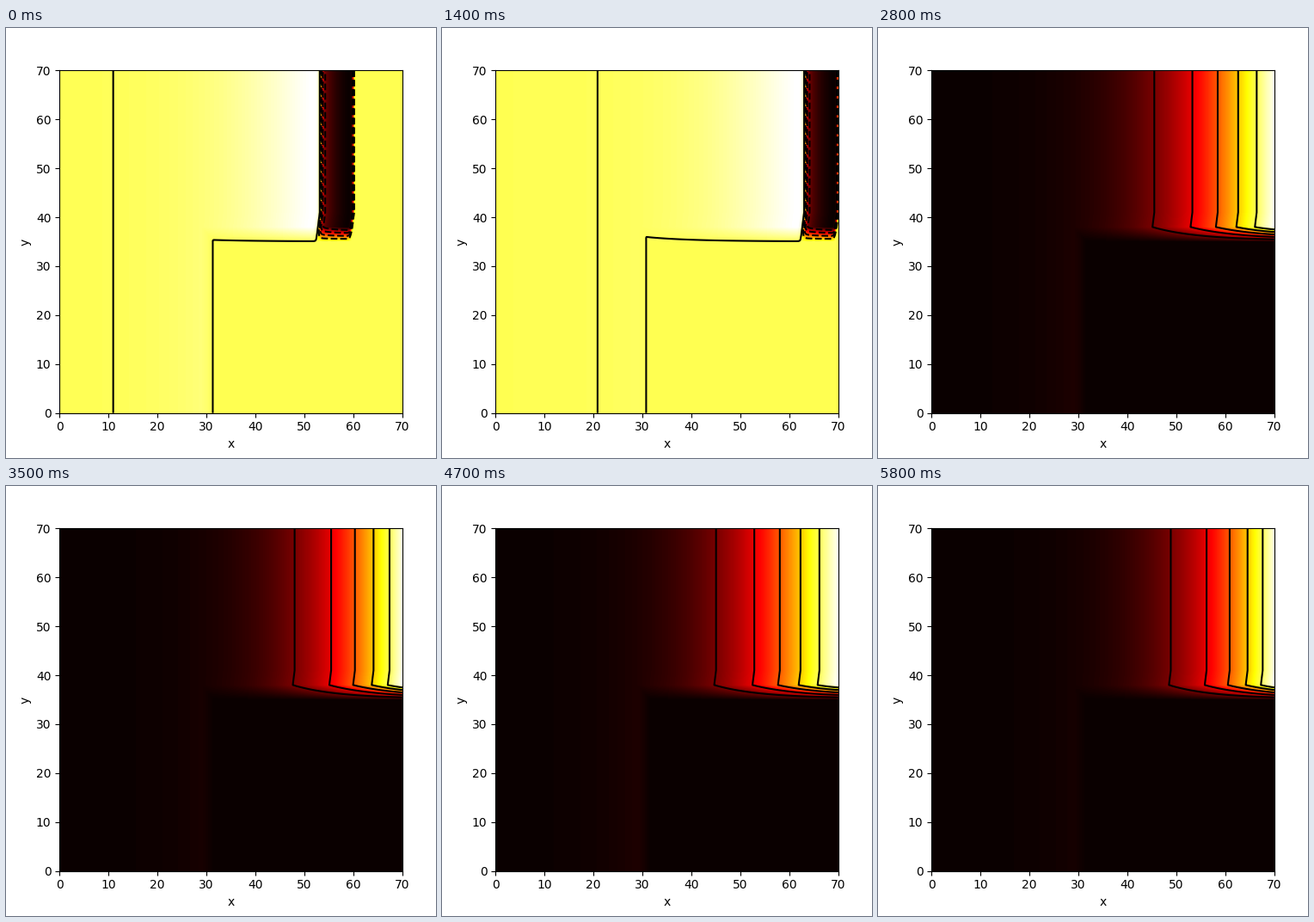
A matplotlib script for the animation above (5900 ms loop, 500 by 500 pixels).

```python
import numpy as np
import matplotlib.pyplot as plt
from matplotlib.animation import FuncAnimation

SIZE = 70
FRAMES = 59
REPLAY_AT, REPLAY_SHIFT = 39, 20
SPEED = 0.705
START = 53.1

axis = np.linspace(0, SIZE, 351)
half = (axis[1] - axis[0]) / 2
X, Y = np.meshgrid(axis, axis)

# The lower right block was reset to rest; its borders are soft ramps.
upper = np.clip((Y - 35) / 3, 0, 1)
left = np.clip((31.6 - X) / 2.6, 0, 1)
mask = np.maximum(upper, left)
lag = 0.75 * np.clip((41 - Y) / 6, 0, 1) * (1 - left)


def step(d, width):
    return 1 / (1 + np.exp(-np.clip(d / width, -60, 60)))


def field(step_no):
    """Travelling pulse: sharp front, slow plateau, sharp back, long tail."""
    d = X - (START + SPEED * step_no - lag)
    tail = 1.08 * np.exp(-(np.maximum(-d, 0) / 17.6) ** 1.4)
    plateau = 5.24 - 1.55 * np.exp(-0.33 * np.maximum(d, 0))
    back = step(d - 0.324, 0.234)
    front = step(6.85 - d, 0.12)
    return mask * front * ((1 - back) * tail - back * plateau)


fig = plt.figure(figsize=(5, 5), dpi=100)
ax = fig.add_axes([0.1245, 0.1045, 0.7975, 0.797])
image = ax.imshow(field(0), cmap="hot", origin="lower", aspect="auto",
                  interpolation="bilinear",
                  extent=(-half, SIZE + half, -half, SIZE + half))
ax.set(xlim=(0, SIZE), ylim=(0, SIZE), xlabel="x", ylabel="y")
ax.set_xticks(range(0, SIZE + 1, 10))
ax.set_yticks(range(0, SIZE + 1, 10))
contours = []


def update(i):
    u = field(i if i < REPLAY_AT else i - REPLAY_SHIFT)
    low, high = u.min(), u.max()
    image.set_data(u)
    image.set_clim(low, high)
    while contours:
        contours.pop().remove()
    levels = np.linspace(low, high, 7)[1:-1]
    contours.append(ax.contour(X, Y, u, levels=levels, colors="k",
                               linewidths=1.5))
    return [image]


anim = FuncAnimation(fig, update, frames=FRAMES, interval=100,
                     init_func=lambda: [image], repeat=True, repeat_delay=0)
plt.show()
```
